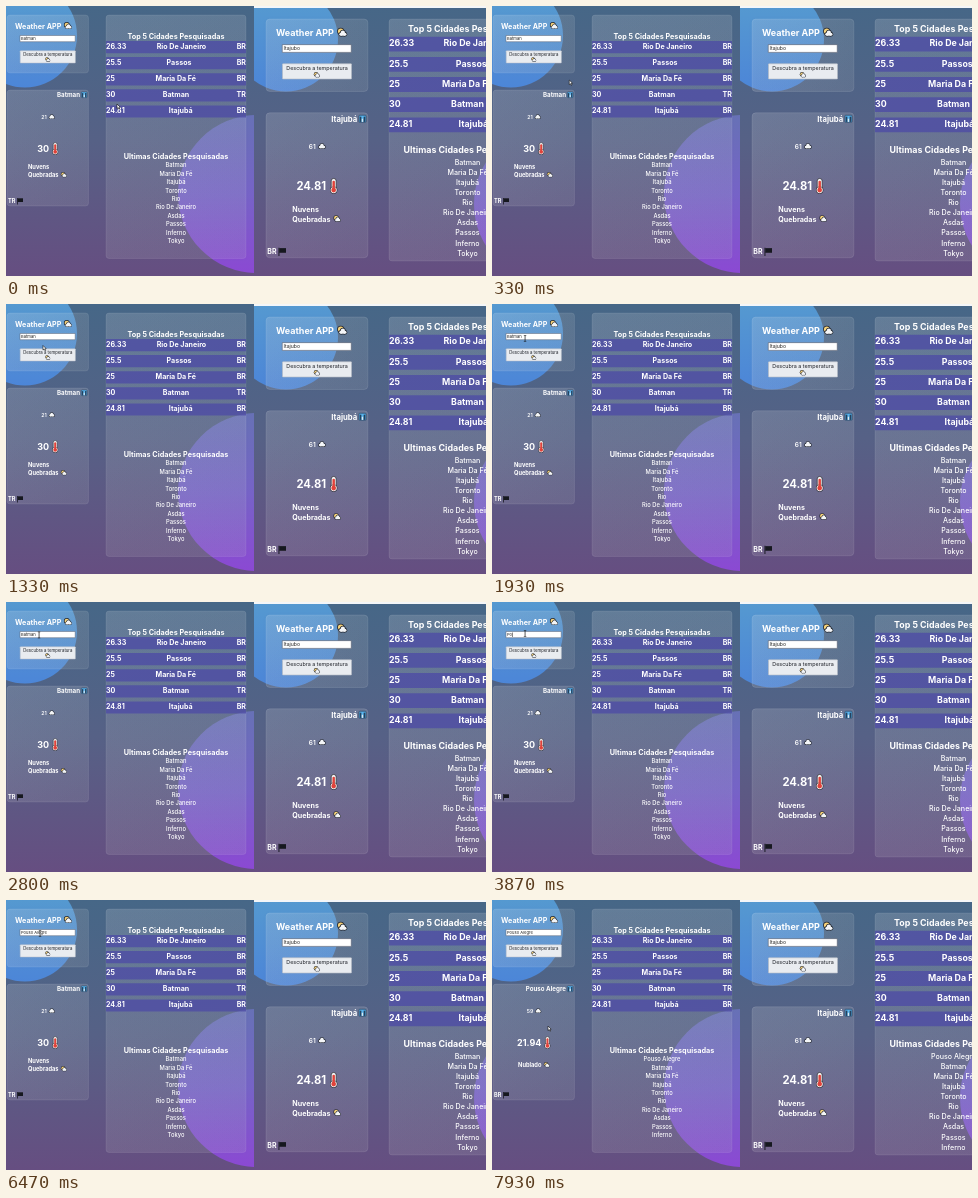
Animation of 480x270 px, one loop 8000 ms. Source, as an HTML page with a canvas:

```html
<!DOCTYPE html>
<html lang="pt">
<head>
<meta charset="utf-8">
<title>Weather APP</title>
<style>
html, body { margin: 0; width: 100%; height: 100%; overflow: hidden; background: #56617f; }
canvas { display: block; width: 480px; height: 270px; }
</style>
</head>
<body>
<canvas id="stage" width="480" height="270"></canvas>
<script>
const LOOP = 8000, SPLIT = 248, RESULT_AT = 7400;
const c = document.getElementById('stage').getContext('2d');

const top5 = [
  ['26.33', 'Rio De Janeiro', 'BR'], ['25.5', 'Passos', 'BR'],
  ['25', 'Maria Da Fé', 'BR'], ['30', 'Batman', 'TR'], ['24.81', 'Itajubá', 'BR']
];
const recent = ['Batman', 'Maria Da Fé', 'Itajubá', 'Toronto', 'Rio', 'Rio De Janeiro',
  'Asdas', 'Passos', 'Inferno', 'Tokyo'];
const batman = { city: 'Batman', clouds: '21', temp: '30', sky: ['Nuvens', 'Quebradas'], code: 'TR' };
const pouso = { city: 'Pouso Alegre', clouds: '59', temp: '21.94', sky: ['Nublado'], code: 'BR' };
const itajuba = { city: 'Itajubá', clouds: '61', temp: '24.81', sky: ['Nuvens', 'Quebradas'], code: 'BR' };

const keyTimes = [3500, 3730, 4000, 4270, 4530, 4800, 5000, 5270, 5400, 5670, 5730, 5930];
const pointerPath = [
  [0, 111, 98], [70, 110, 97], [600, 43, 50], [870, 41, 49], [930, 41, 49], [1730, 33, 34],
  [2600, 33, 33], [3200, 33, 31], [5930, 33, 31], [6330, 34, 33], [6800, 34, 33],
  [7200, 44, 50], [7600, 45, 52], [7900, 56, 126], [8000, 56, 126]
];

function gradient(x0, y0, x1, y1, ...colors) {
  const g = c.createLinearGradient(x0, y0, x1, y1);
  colors.forEach((color, i) => g.addColorStop(i / (colors.length - 1), color));
  return g;
}

function rect(x, y, w, h, fill, radius = 0, stroke) {
  c.beginPath();
  c.roundRect(x, y, w, h, radius);
  c.fillStyle = fill;
  c.fill();
  if (stroke) { c.strokeStyle = stroke; c.lineWidth = 0.5; c.stroke(); }
}

function disc(x, y, r, fill) {
  c.beginPath();
  c.arc(x, y, r, 0, 7);
  c.fillStyle = fill;
  c.fill();
}

function text(str, x, y, size, weight = 700, align = 'left', color = '#fff') {
  c.font = `${weight} ${size}px Inter, sans-serif`;
  c.textAlign = align;
  c.textBaseline = 'alphabetic';
  c.fillStyle = color;
  c.fillText(str, x, y + size * 0.36);
  return c.measureText(str).width;
}

function polygon(points, fill, stroke) {
  c.beginPath();
  points.forEach(([x, y]) => c.lineTo(x, y));
  c.closePath();
  c.fillStyle = fill;
  c.fill();
  c.strokeStyle = stroke;
  c.lineWidth = 0.6;
  c.stroke();
}

function glass(x, y, w, h) {
  c.save();
  c.shadowColor = 'rgba(30,35,70,.25)';
  c.shadowBlur = 4;
  rect(x, y, w, h, gradient(x, y, x + w, y + h, 'rgba(255,255,255,.16)', 'rgba(215,220,215,.12)'), 3);
  c.restore();
  rect(x, y, w, h, 'transparent', 3, 'rgba(255,255,255,.16)');
}

// Icons are drawn around their centre; s is the width.
function cloud(x, y, s) {
  for (const [grow, color] of [[0.08, '#20242c'], [0, '#f4f6f8']]) {
    disc(x - s * 0.24, y + s * 0.1, s * (0.18 + grow), color);
    disc(x, y - s * 0.08, s * (0.25 + grow), color);
    disc(x + s * 0.25, y + s * 0.1, s * (0.18 + grow), color);
    rect(x - s * 0.25, y, s * 0.5, s * (0.28 + grow), color);
  }
}

function sunnyCloud(x, y, s) {
  disc(x - s * 0.15, y - s * 0.14, s * 0.36, '#20242c');
  disc(x - s * 0.15, y - s * 0.14, s * 0.28, '#f6d27a');
  cloud(x + s * 0.06, y + s * 0.06, s * 0.85);
}

function thermometer(x, y, s) {
  rect(x - s * 0.28, y - s * 0.85, s * 0.56, s * 1.4, '#f4f5f7', s * 0.28, '#222');
  disc(x, y + s * 0.48, s * 0.42, '#222');
  disc(x, y + s * 0.48, s * 0.36, '#f4f5f7');
  disc(x, y + s * 0.48, s * 0.27, '#e0433a');
  rect(x - s * 0.14, y - s * 0.6, s * 0.28, s, '#e0433a', s * 0.14);
}

function skyline(x, y, s) {
  rect(x - s / 2, y - s / 2, s, s, '#58b4ee', 0.6, '#263d59');
  rect(x - s * 0.4, y - s * 0.3, s * 0.24, s * 0.75, '#24425f');
  rect(x - s * 0.1, y, s * 0.2, s * 0.45, '#dceaf3');
  rect(x + s * 0.16, y - s * 0.3, s * 0.24, s * 0.75, '#24425f');
}

function flag(x, y, s) {
  rect(x - s / 2, y - s / 2, s * 0.12, s * 1.1, '#11131a');
  rect(x - s * 0.4, y - s * 0.45, s * 0.9, s * 0.62, '#16181f');
}

function iconLine(str, y, size, weight, icon, iconSize, gap) {
  c.font = `${weight} ${size}px Inter, sans-serif`;
  const w = c.measureText(str).width, x = 42 - (w + gap + iconSize) / 2;
  text(str, x, y, size, weight);
  icon(x + w + gap + iconSize / 2, y, iconSize);
}

function searchCard(query, caret) {
  glass(1, 9, 81.5, 58);
  text('Weather APP', 9, 20, 7.2);
  sunnyCloud(62, 20, 8);
  rect(14, 29.5, 55.2, 6.2, '#fff', 0, '#5b6272');
  const w = text(query, 15, 32.7, 4.1, 400, 'left', '#222');
  if (caret) rect(15.3 + w, 30.4, 0.5, 4.5, '#111');
  rect(14.2, 44.8, 55.2, 12.2, '#e9ecf0', 0.4, '#b4bac4');
  text('Descubra a temperatura', 41.8, 48.1, 4.3, 400, 'center', '#1c1f26');
  sunnyCloud(41.8, 53.8, 5);
}

function weatherCard(w) {
  glass(1, 84, 81.5, 116);
  text(w.city, 74, 89, 6.2, 700, 'right');
  skyline(78.2, 88.8, 5.6);
  iconLine(w.clouds, 110.8, 5.2, 600, cloud, 6, 2);
  iconLine(w.temp, 142.5, 9, 700, thermometer, 7, 2.5);
  if (w.sky.length > 1) {
    text(w.sky[0], 22, 161, 5.7);
    text(w.sky[1], 22, 169, 5.7);
    sunnyCloud(58, 169, 6);
  } else iconLine(w.sky[0], 165, 5.7, 700, sunnyCloud, 6, 2.5);
  text(w.code, 2, 195, 5.6);
  flag(14, 195, 6);
}

function rankings(p, names) {
  const mid = (p.left + p.right) / 2;
  glass(p.left, p.top, p.right - p.left, p.bottom - p.top);
  text('Top 5 Cidades Pesquisadas', mid, p.title, p.heading, 700, 'center');
  top5.forEach(([temp, city, code], i) => {
    const y = p.row + i * p.rowStep;
    rect(p.left, y + 0.8 - p.bar / 2, p.right - p.left, p.bar, 'rgba(77,74,166,.76)');
    const a = text(temp, p.left, y, p.rowSize);
    const b = text(code, p.right, y, p.rowSize, 700, 'right');
    text(city, mid + (a - b) / 2, y, p.rowSize, 700, 'center');
  });
  text('Ultimas Cidades Pesquisadas', mid, p.title2, p.heading, 700, 'center');
  names.forEach((name, i) => text(name, mid, p.list + i * p.listStep, p.listSize, 500, 'center'));
}

const leftRank = { left: 100, right: 240, top: 9, bottom: 252.5, title: 30, heading: 7.25, row: 40.3,
  rowStep: 16.1, bar: 12.2, rowSize: 7.1, title2: 150, list: 159.2, listStep: 8.42, listSize: 5.8 };
const rightRank = { left: 383, right: 540, top: 13, bottom: 255, title: 23, heading: 8.9, row: 37.3,
  rowStep: 20.2, bar: 14.8, rowSize: 8.8, title2: 144, list: 156.2, listStep: 10.1, listSize: 7.1 };

function pane(x, w, blue, purple, paint) {
  c.save();
  c.beginPath();
  c.rect(x, 0, w, 270);
  c.clip();
  rect(x, 0, w, 270, gradient(0, 0, 0, 270, '#466787', '#566186', '#664e81'));
  disc(...blue, 52, gradient(0, 0, 0, 85, '#5599d0', '#4c85d8'));
  disc(...purple, 79, gradient(0, 109, 0, 267, '#6771b6', '#7663c7', '#8b49d3'));
  paint();
  c.restore();
}

function pointerAt(t) {
  const i = pointerPath.findIndex(p => p[0] > t);
  const [t0, x0, y0] = pointerPath[i - 1], [t1, x1, y1] = pointerPath[i];
  const u = (t - t0) / (t1 - t0), e = u * u * (3 - 2 * u);
  return [x0 + (x1 - x0) * e, y0 + (y1 - y0) * e];
}

function pointer(x, y) {
  const inField = x > 14 && x < 70;
  if (inField && y > 28 && y < 36) {
    rect(x - 0.3, y - 2.5, 0.7, 6, '#111');
    rect(x - 1.2, y - 2.8, 2.5, 0.5, '#111');
    rect(x - 1.2, y + 3.3, 2.5, 0.5, '#111');
  } else if (inField && y > 44 && y < 57) {
    rect(x - 0.5, y, 1.2, 4, '#fff', 0.5, '#111');
    rect(x - 1.5, y + 2.5, 4, 3, '#fff', 1, '#111');
  } else {
    polygon([[x, y], [x, y + 4.6], [x + 1.1, y + 3.6], [x + 2, y + 5.3],
      [x + 2.7, y + 4.9], [x + 1.9, y + 3.3], [x + 3.2, y + 3.2]], '#fff', '#111');
  }
}

function draw(t) {
  const done = t >= RESULT_AT;
  const typed = keyTimes.filter(k => k <= t).length;
  const query = t < 3400 ? 'Batman' : 'Pouso Alegre'.slice(0, typed);
  const names = done ? ['Pouso Alegre', ...recent.slice(0, 9)] : recent;

  pane(0, SPLIT, [19, 29.5], [251, 188], () => {
    searchCard(query, t > 3200 && t < 6000);
    weatherCard(done ? pouso : batman);
    rankings(leftRank, names);
    pointer(...pointerAt(t));
  });
  pane(SPLIT, 480 - SPLIT, [280, 33.5], [547, 198], () => {
    c.save();
    c.translate(258.75, 1.75);
    c.scale(1.25, 1.25);
    searchCard('Itajubo');
    weatherCard(itajuba);
    c.restore();
    rankings(rightRank, names);
    rect(SPLIT, 0, 480 - SPLIT, 2, '#f4f6f8');
  });
}

function frame() {
  draw(performance.now() % LOOP);
  requestAnimationFrame(frame);
}
frame();
</script>
</body>
</html>
```
